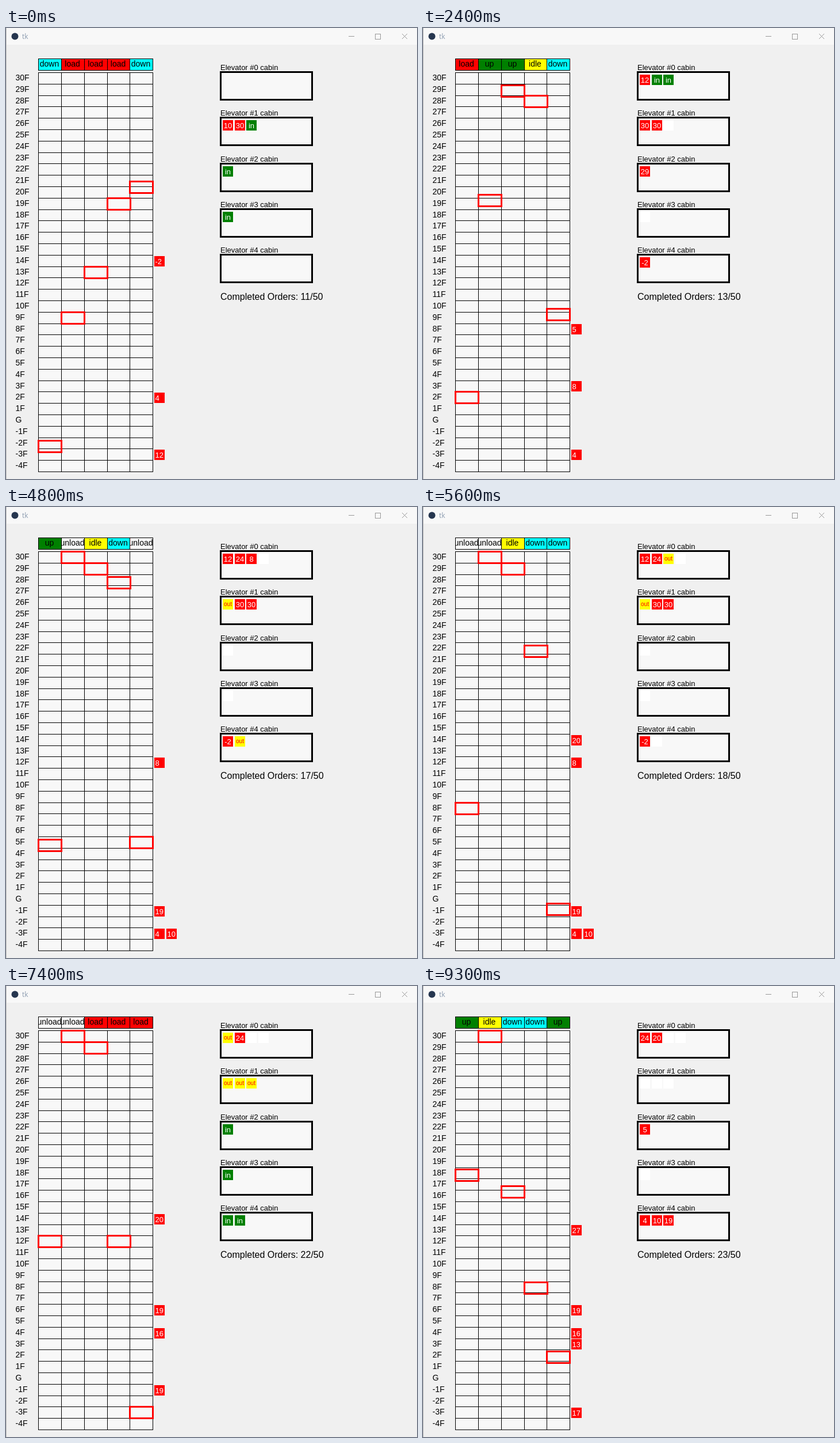
Write an HTML page with a canvas that moves like this. It is 715 by 783 pixels and loops after 9400 ms.

```html
<!DOCTYPE html>
<html lang="en">
<head>
<meta charset="utf-8">
<title>tk</title>
<style>
html, body { margin: 0; width: 100%; height: 100%; overflow: hidden; background: #f0f0f0; }
canvas { display: block; }
</style>
</head>
<body>
<canvas id="stage" width="715" height="783"></canvas>
<script>
const ctx = document.getElementById('stage').getContext('2d');
const LOOP = 9400, TICK = 100, SPEED = 0.1487;
const ROW = 19.8, COL = 39.7, LEFT = 56.4, TOP = 77, ROWS = 35, CARS = 5;
const PALE = '#f8f8f8', SANS = '"Liberation Sans", Arial, sans-serif';
const STATUS = { down: '#00ffff', up: '#008000', load: '#ff0000', unload: PALE, idle: '#ffff00' };

const floorY = floor => TOP + (30 - floor) * ROW;
const colX = i => Math.round(LEFT + i * COL);
const floorName = n => n === 0 ? 'G' : n + 'F';

// Stops: floor, activity, departure time, cabin while there, cabin afterwards
const routes = [
  { y: 716, stops: [
    [-3, 'load', 1003, 'in', '12'],
    [2, 'load', 2586, '12 in in', '12 4 24'],
    [3, 'load', 3643, '12 4 24 in', '12 4 24 8'],
    [4, 'unload', 4700, '12 out 24 8', '12 24 8'],
    [8, 'unload', 6153, '12 24 out', '12 24'],
    [12, 'unload', 7610, 'out 24', '24'],
    [14, 'load', 8790, '24 in', '24 20'],
    [30, 'idle', LOOP, '', '']] },
  { y: floorY(9), stops: [
    [9, 'load', 103, '10 30 in', '10 30 30'],
    [10, 'unload', 1160, 'out 30 30', '30 30'],
    [24, 'load', 3948, '30 30 in', '30 30 30'],
    [30, 'unload', 5674, 'out 30 30', ''],
    [30, 'unload', 6598, 'out out 30', ''],
    [30, 'unload', 7522, 'out out out', ''],
    [30, 'idle', LOOP, '', '']] },
  { y: floorY(13), stops: [
    [13, 'load', 281, 'in', '29'],
    [29, 'unload', 3335, 'out', ''],
    [29, 'idle', 6695, '', ''],
    [29, 'load', 7619, 'in', '5'],
    [-4, 'idle', LOOP, '', '']] },
  { y: floorY(19), stops: [
    [19, 'load', 203, 'in', '28'],
    [28, 'unload', 2325, 'out', ''],
    [28, 'idle', 4770, '', ''],
    [12, 'load', 7830, 'in', '8'],
    [8, 'unload', 9288, 'out', ''],
    [-4, 'idle', LOOP, '', '']] },
  { y: 266, stops: [
    [14, 'load', 1772, 'in', '-2'],
    [8, 'load', 3495, '-2 in', '-2 5'],
    [5, 'unload', 4820, '-2 out', '-2'],
    [-2, 'unload', 6675, 'out', ''],
    [-3, 'load', 7730, 'in in', '4 10'],
    [-1, 'load', 8920, '4 10 in', '4 10 19'],
    [30, 'idle', LOOP, '', '']] }
];

// Waiting passengers: floor, destination, appears, picked up
const calls = [
  [14, '-2', 0, 850], [2, '4', 0, 1662], [2, '24', 1400, 1662],
  [-3, '12', 0, 100], [-3, '4', 700, 6810], [-3, '10', 3900, 6810],
  [8, '5', 500, 2570], [3, '8', 1900, 2719], [24, '30', 2600, 3024],
  [12, '8', 4770, 6900], [-1, '19', 4100, 8000], [14, '20', 5500, 7866],
  [4, '16', 6000, LOOP], [6, '19', 7400, LOOP], [3, '13', 7900, LOOP],
  [13, '27', 8800, LOOP], [-3, '17', 9000, LOOP]
];

// Turns a route into phases with constant velocity
function plan({ y, stops }) {
  const phases = [];
  let time = 0, cabin = '';
  for (const [floor, activity, leave, during, after] of stops) {
    const goal = floorY(floor), dir = Math.sign(goal - y);
    if (dir) {
      phases.push({ start: time, y, v: dir * SPEED, status: dir > 0 ? 'down' : 'up', cabin });
      time += Math.abs(goal - y) / SPEED;
    }
    phases.push({ start: time, y: goal, v: 0, status: activity, cabin: during });
    [time, y, cabin] = [leave, goal, after];
  }
  return phases;
}
const plans = routes.map(plan);
const slots = cabin => cabin ? cabin.split(' ') : [];

function rect(x, y, w, h, color) {
  ctx.fillStyle = color;
  ctx.fillRect(x, y, w, h);
}

function text(str, x, y, size, color = '#000', align = 'left', family = SANS) {
  ctx.font = `${size}px ${family}`;
  ctx.textAlign = align;
  ctx.fillStyle = color;
  ctx.fillText(str, x, y);
}

function outline(x, y, w, h, color, width) {
  ctx.strokeStyle = color;
  ctx.lineWidth = width;
  ctx.strokeRect(x, y, w, h);
}

function drawWindow() {
  rect(0, 0, 715, 783, '#f0f0f0');
  rect(0, 0, 715, 29, PALE);
  rect(0, 0, 1, 783, '#c0c0c0');
  ctx.fillStyle = '#26364f';
  ctx.beginPath();
  ctx.arc(15.5, 14.5, 6, 0, 7);
  ctx.fill();
  text('tk', 28, 19, 12, '#8c9bb0', 'left', '"Open Sans", sans-serif');
  rect(596, 14, 10, 1, '#999');
  outline(642.5, 10.5, 9, 9, '#999', 1);
  ctx.beginPath();
  ctx.moveTo(689, 10); ctx.lineTo(698, 19);
  ctx.moveTo(698, 10); ctx.lineTo(689, 19);
  ctx.stroke();
}

function drawGrid() {
  const width = colX(CARS) - colX(0) + 1;
  rect(colX(0), TOP, width, ROWS * ROW, PALE);
  for (let r = 0; r <= ROWS; r++) {
    const y = Math.round(TOP + r * ROW);
    rect(colX(0), y, width, 1, '#000');
    if (r < ROWS) text(floorName(30 - r), 16.5, y + 14, 14);
  }
  for (let i = 0; i <= CARS; i++) rect(colX(i), TOP, 1, ROWS * ROW, '#000');
}

function drawStatus(i, status) {
  const x = colX(i), w = colX(i + 1) - x;
  rect(x, 53, w + 1, 21, '#000');
  rect(x + 1, 54, w - 1, 19, STATUS[status]);
  ctx.save();
  ctx.beginPath();
  ctx.rect(x + 1, 54, w - 1, 19);
  ctx.clip();
  text(status, x + w / 2 - 0.5, 67, 14, '#000', 'center');
  ctx.restore();
}

function drawCabin(i, cabin, used) {
  const y = Math.round(76.5 + i * 79.25 - 0.5) + 0.5;
  text(`Elevator #${i} cabin`, 373, y - 3.5, 13);
  rect(373, y, 160, 48, PALE);
  outline(373.5, y, 159, 48, '#000', 3);
  const people = slots(cabin);
  for (let k = 0; k < used; k++) {
    const x = Math.round(377 + k * 20.7), who = people[k];
    const color = { in: '#008000', out: '#ffff00' }[who] || (who ? '#ff0000' : '#fff');
    rect(x, y + 4.5, 18, 18, color);
    if (who === 'out') text(who, x + 9, y + 16.5, 10, '#ff0000', 'center');
    else if (who) text(who, x + 9, y + 18, 13, '#fff', 'center');
  }
}

function drawCalls(t) {
  const queue = {};
  for (const [floor, goal, from, to] of calls) {
    if (t < from || t >= to) continue;
    const place = queue[floor] = (queue[floor] ?? -1) + 1;
    const x = Math.round(258 + place * 20.7), y = Math.round(floorY(floor) + 1.8);
    rect(x, y, 18, 18, '#ff0000');
    text(goal, x + 1.5, y + 13.5, 13, '#fff');
  }
}

function draw(t) {
  drawWindow();
  drawGrid();
  let completed = 11;
  const cars = plans.map((phases, i) => {
    const past = phases.filter(p => p.start <= t), now = past[past.length - 1];
    completed += past.filter(p => p.status === 'unload').length;
    drawStatus(i, now.status);
    drawCabin(i, now.cabin, Math.max(...past.map(p => slots(p.cabin).length)));
    return now.y + now.v * (t - now.start);
  });
  cars.forEach((y, i) => outline(colX(i) + 0.5, Math.round(y) + 0.5, 40, 20, '#ff0000', 3));
  drawCalls(t);
  text(`Completed Orders: ${completed}/50`, 373, 472, 16);
}

const begin = performance.now();
function frame() {
  const t = (performance.now() - begin) % LOOP;
  draw(Math.floor(t / TICK) * TICK);
  requestAnimationFrame(frame);
}
frame();
</script>
</body>
</html>
```
